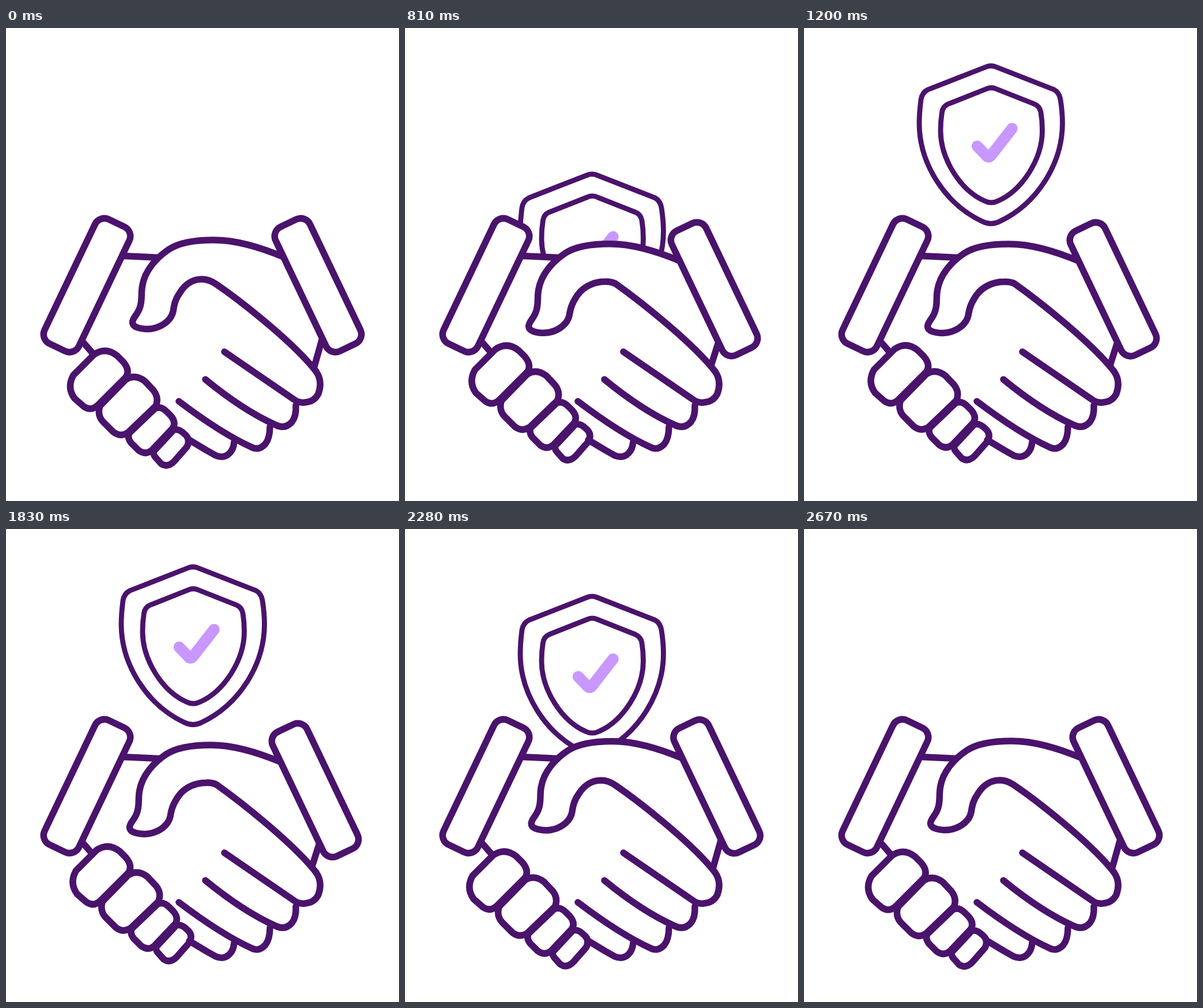
Write an HTML page that moves like this. It is 682x821 px and loops after 3300 ms.

```html
<!DOCTYPE html>
<html lang="en">
<head>
<meta charset="utf-8">
<title>Handshake and shield</title>
<style>
  html, body { margin: 0; width: 100%; height: 100%; overflow: hidden; background: #fff; }
  svg { display: block; width: 100%; height: 100%; }
  path, rect { fill: #fff; stroke: #4a136c; stroke-width: 11.5; stroke-linecap: round; stroke-linejoin: round; }
  .line { fill: none; }
  .mask { stroke: none; }
  #shield path { stroke-width: 8.8; }
  #shield .check { fill: none; stroke: #c897ff; stroke-width: 19.5; }
</style>
</head>
<body>
<svg viewBox="0 0 682 821">
  <g id="shield">
    <path d="M316 67.5Q324.5 64 333 67.5L434 107Q443 112 445 124C447.5 140 448.500 150 448.500 165C448.500 235 405 305 339 336Q324.5 343 310 336C244 305 200 235 200 165C200 150 201 140 203 124Q205 112 215 107Z"/>
    <path d="M317 105.5Q325 102 333 105.5L400 132Q409 136 411 146C413 158 413.5 168 413.5 178C413.5 228 378 282 337 300Q325 306 313 300C272 282 237 228 237 178C237 168 237.500 158 239.500 146Q241 136 250 132Z"/>
    <path class="check" d="M300.500 205L315 220Q320.500 228 326 219.500L361 174.500"/>
  </g>

  <path class="mask" d="M201 396L268 399L300 420L478 420L545 545L535 590L480 670L318 716L220 650L130 541Z"/>
  <path class="line" d="M201 395.500L266 398.500M130 541L156 571"/>
  <rect x="107.500" y="327" width="66" height="239" rx="18" transform="rotate(25.500 140.500 446.500)"/>

  <path id="thumbMask" class="mask"/>
  <path id="wrist" class="line"/>
  <path id="thumb" class="line"/>
  <g id="cuff">
    <rect x="508.500" y="327" width="66" height="239" rx="18" transform="rotate(-25.500 541.500 446.500)"/>
  </g>

  <g id="fingers">
    <path d="M117 602.500L152.500 567Q173 553 193 569L203 579Q216 594 208 606L160 654Q148 666 135 657L119 643Q105 624 117 602.500Z"/>
    <path d="M163 656L208 610Q224 600 241 613L256 629Q266 642 260 656L212 702Q199 711 186 701L168 683Q158 672 163 656Z"/>
    <path d="M214 703L258 661Q268 655 279 666L286 673Q296 685 289 695L253 733Q242 742 230 733L217 720Q210 711 214 703Z"/>
    <path d="M256 735L291 697.500Q300 695 309 704Q321 713 314 727L292 752Q280 764 269 756L261 747Q255 741 256 735Z"/>
  </g>

  <path class="line" d="M318 715L348 733L364 742Q378 748 388 738Q395 731 396 718"/>
  <path class="line" d="M300 648Q374 704 427 728Q439 734 450 722Q458 712 458 692"/>
  <path class="line" d="M346 610Q412 664 468 689Q484 697 496 684Q504 674 503 655"/>
  <path class="line" d="M379 562L500 645Q508 651 518 650Q535 649 542 635Q550 613 538 596"/>
</svg>
<script>
const LOOP = 3300, STEP = 30;
const DROP = 334, HIDDEN = 290;
const el = id => document.getElementById(id);

// Smooth progress of t through a span, from 0 to 1
function ease(t, start, end) {
  const x = Math.min(1, Math.max(0, (t - start) / (end - start)));
  return x * x * (3 - 2 * x);
}

function thumbPath(s) {
  // Points ride with the arm; those near the palm crease move on their own
  const at = (x, y, dx = -5, dy = 7) => `${x + dx * s} ${y + dy * s} `;
  return 'M' + at(483, 398) +
    'C' + at(440, 380) + at(400, 368) + at(360, 368) +
    'C' + at(325, 368) + at(300, 373) + at(283, 384) +
    'C' + at(262, 398) + at(241, 420) + at(236.5, 448) +
    'C' + at(234, 462) + at(237, 474) + at(232, 486) +
    'C' + at(228, 498) + at(219.5, 503) + at(219.5, 511) +
    'C' + at(219.5, 519) + at(232, 522.5) + at(246, 522.5) +
    'C' + at(266, 522) + at(286, 510) + at(290, 492) +
    'C' + at(292, 480) + at(293, 472, -4, 7) + at(302, 459, -3, 5) +
    'C' + at(312, 443, -1, 4) + at(326, 436, 5, 4.5) + at(340, 436, 7, 4.5) +
    'C' + at(350, 436, 5, 4) + at(356, 439, 4, 2) + at(363, 443.5, 2, 0) +
    'C408 474 499 546 538 596';
}

function draw(t) {
  const s = ease(t, 300, 870) - ease(t, 1800, 2370);
  const thumb = thumbPath(s);
  el('thumb').setAttribute('d', thumb);
  el('thumbMask').setAttribute('d', `${thumb}L${547 - 5 * s} ${540 + 7 * s}Z`);
  el('wrist').setAttribute('d', `M${549 - 5 * s} ${538 + 7 * s}L${535 - 4 * s} ${588 - 2 * s}`);
  el('cuff').setAttribute('transform', `translate(${-5 * s} ${7 * s})`);
  el('fingers').setAttribute('transform', `translate(${4.5 * s} ${-9.5 * s})`);

  const drop = DROP * (1 - ease(t, 480, 1200) + ease(t, 2102, 2822));
  el('shield').setAttribute('transform', `translate(0 ${drop})`);
  el('shield').setAttribute('visibility', drop < HIDDEN ? 'visible' : 'hidden');
}

const begin = performance.now();
function tick() {
  const t = (performance.now() - begin) % LOOP;
  draw(Math.floor(t / STEP) * STEP);
  requestAnimationFrame(tick);
}
draw(0);
requestAnimationFrame(tick);
</script>
</body>
</html>
```
